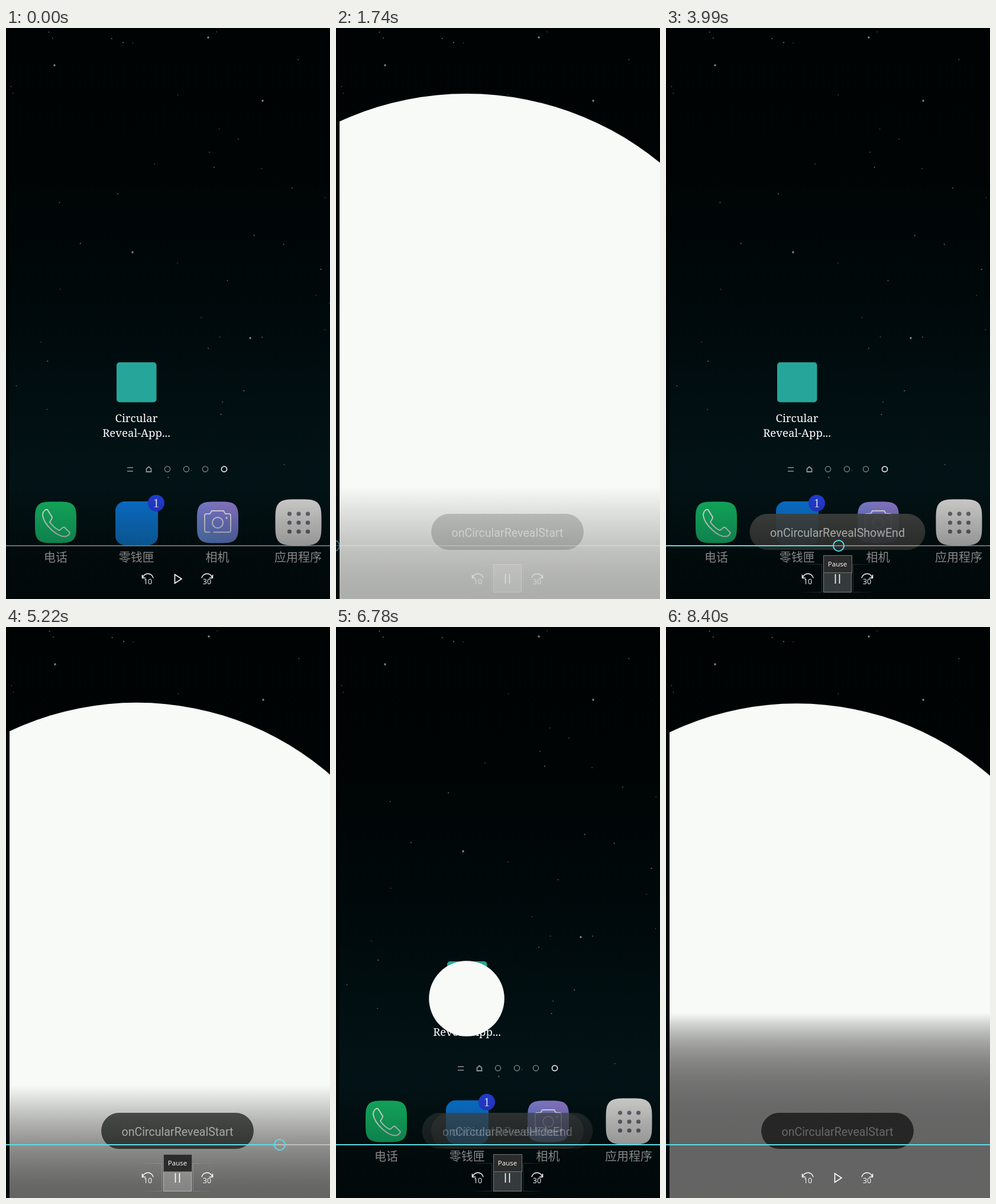
These frames come from a looping animation (548x965 px, 9000 ms). An HTML page with a canvas:

```html
<!DOCTYPE html>
<html lang="zh">
<head>
<meta charset="utf-8">
<title>Circular reveal</title>
<style>
  html, body { margin: 0; width: 100%; height: 100%; overflow: hidden; background: #000; }
  canvas { display: block; }
</style>
</head>
<body>
<canvas id="stage" width="548" height="965"></canvas>
<script>
const W = 548, H = 965, LOOP = 9000, HOLD_FROM = 8400;
let ctx = document.getElementById('stage').getContext('2d');

const clamp = v => Math.max(0, Math.min(1, v));
const ramp = (t, from, to) => clamp((t - from) / (to - from));
const lerp = (a, b, p) => a + (b - a) * p;
const easeInOut = p => (1 - Math.cos(Math.PI * clamp(p))) / 2;

function track(points, t) {
  const next = points.findIndex(([time]) => t < time);
  if (next < 1) return points.at(next)[1];
  const [t0, v0] = points[next - 1], [t1, v1] = points[next];
  return lerp(v0, v1, ramp(t, t0, t1));
}

function withAlpha(alpha, draw) {
  if (alpha <= 0) return;
  ctx.save();
  ctx.globalAlpha *= alpha;
  draw();
  ctx.restore();
}

// Evenly spaced colours from one point to another
function gradient(x0, y0, x1, y1, colors) {
  const g = ctx.createLinearGradient(x0, y0, x1, y1);
  colors.forEach((color, i) => g.addColorStop(i / (colors.length - 1), color));
  return g;
}

function roundRect(x, y, w, h, r, fill) {
  ctx.beginPath();
  ctx.roundRect(x, y, w, h, r);
  ctx.fillStyle = fill;
  ctx.fill();
}

function squircle(cx, cy, r, fill) {
  const bend = v => Math.sign(v) * Math.sqrt(Math.abs(v));
  ctx.beginPath();
  for (let a = 0; a < 2 * Math.PI; a += 0.03)
    ctx.lineTo(cx + r * bend(Math.cos(a)), cy + r * bend(Math.sin(a)));
  ctx.fillStyle = fill;
  ctx.fill();
}

function disc(x, y, r, fill) {
  ctx.beginPath();
  ctx.arc(x, y, r, 0, 2 * Math.PI);
  ctx.fillStyle = fill;
  ctx.fill();
}

function ring(x, y, r, color, width) {
  ctx.beginPath();
  ctx.arc(x, y, r, 0, 2 * Math.PI);
  ctx.strokeStyle = color;
  ctx.lineWidth = width;
  ctx.stroke();
}

function line(path, color, width) {
  ctx.strokeStyle = color;
  ctx.lineWidth = width;
  ctx.stroke(new Path2D(path));
}

function text(str, x, y, font, color = '#fff') {
  ctx.font = font;
  ctx.fillStyle = color;
  ctx.textAlign = 'center';
  ctx.fillText(str, x, y);
}

// Home screen

const SERIF = '18.6px "Noto Serif", serif';
const LABEL = '300 20px "Noto Sans CJK SC", "Noto Sans CJK", sans-serif';

function seededRandom(seed) {
  return () => (seed = seed * 16807 % 2147483647) / 2147483647;
}

function drawSky() {
  ctx.fillStyle = gradient(0, 0, 0, H, ['#000303', '#000404', '#00090b', '#021215', '#031517']);
  ctx.fillRect(0, 0, W, H);
  ctx.fillStyle = 'rgba(0,0,0,.6)';
  ctx.fillRect(0, 0, 6, H);
}

function drawStars() {
  const random = seededRandom(77);
  for (let i = 0; i < 44; i++)
    disc(8 + random() * 540, random() * 770, 0.7 + random() * 0.5, 'rgba(160,175,175,.55)');
  for (const [x, y] of [[82, 63], [342, 16], [434, 123], [214, 379], [413, 524]])
    disc(x, y, 1.7, 'rgba(190,200,200,.7)');
}

function drawPageMarks() {
  const grey = '#8b9294';
  line('M205 743h10M205 749h10', grey, 1.5);
  line('M237.5 750v-5l4-3.5 4 3.5v5z', grey, 1.8);
  for (let i = 0; i < 4; i++) ring(273 + 32 * i, 745.5, 4.6, i < 3 ? grey : '#fff', i < 3 ? 1.2 : 1.5);
}

function drawDock() {
  squircle(84, 835.5, 35, gradient(0, 800, 0, 871, ['#14b863', '#19d77f']));
  line('M67 814q-5 3-5 10q2 12 15 24q14 13 25 11q5-2 6-6l-9-9q-3-1-6 3l-3 2q-9-4-16-14l3-5q2-3 0-5l-7-11z',
    '#eafff2', 2);

  roundRect(185, 800, 72, 74, 16, gradient(0, 800, 0, 874, ['#0a76d8', '#1290f4']));
  disc(254, 803, 14, '#2540e0');
  text('1', 254, 810, '21px "Liberation Serif", serif');

  squircle(358, 835.5, 35, gradient(375, 800, 340, 871, ['#967fd4', '#7e8ae6', '#6fa6f8']));
  line('M345 852h-6q-3 0-3-3v-25q0-3 3-3h6l3-5h20l3 5h6q3 0 3 3v25q0 3-3 3h-26', '#f4f2ff', 2);
  ring(358, 836, 9, '#f4f2ff', 2);
  disc(373, 828, 1.8, '#f4f2ff');

  squircle(494.5, 835.5, 39, gradient(0, 796, 0, 874, ['#dededc', '#ffffff']));
  for (let i = 0; i < 9; i++) disc(479.5 + 15.5 * (i % 3), 821 + 15 * Math.floor(i / 3), 3.6, '#73747e');

  ['电话', '零钱匣', '相机', '应用程序'].forEach((name, i) => text(name, 84 + 136.7 * i, 902, LABEL));
}

function drawHome(t) {
  drawSky();
  ctx.save();
  ctx.translate(t < 1311 ? 0 : 1, 0);
  drawStars();
  roundRect(187, 565, 67.5, 67.5, 5, '#26a69a');
  text('Circular', 220.5, 665.5, SERIF);
  text('Reveal-App...', 220.5, 690.5, SERIF);
  drawPageMarks();
  drawDock();
  ctx.restore();
}

// Activity reveal: +1 opens, -1 closes

const reveals = [[1311, 1], [2937, -1], [4802, 1], [6249, -1], [7982, 1]];

function drawReveal(t) {
  const open = reveals.reduce((sum, [start, sign]) => sum + sign * easeInOut((t - start) / 660), 0);
  if (open <= 0.0001) return;
  ctx.save();
  ctx.beginPath();
  ctx.rect(6, 0, W - 6, H);
  ctx.clip();
  disc(221, 628, 709 * open, '#f8faf7');
  ctx.restore();
}

// Toasts: each lasts until the next one replaces it

const FADE = 450;
const toasts = [
  ['Start', 1620], ['ShowEnd', 3380], ['Start', 4740], ['HideEnd', 6555], ['Start', 7800]
].map(([event, start], i, all) => ({
  start,
  end: i + 1 < all.length ? all[i + 1][1] : LOOP,
  layer: toastLayer('onCircularReveal' + event)
}));

// Painted on its own layer so that pill and text fade as one
function toastLayer(message) {
  const layer = document.createElement('canvas'), screen = ctx;
  layer.width = W;
  layer.height = 61;
  ctx = layer.getContext('2d');
  ctx.font = '19.6px Roboto, sans-serif';
  const width = ctx.measureText(message).width + 69;
  roundRect(290 - width / 2, 0, width, 61, 30.5, 'rgba(78,81,78,.92)');
  text(message, 290, 39, ctx.font);
  ctx = screen;
  return layer;
}

function drawToast({ start, end, layer }, t) {
  const alpha = ramp(t, start, start + FADE) * (1 - ramp(t, end, end + FADE));
  withAlpha(alpha, () => ctx.drawImage(layer, 0, 821));
}

// Video player controls

const knobTrack = [[1740, -3], [2190, 61], [3090, 202], [3990, 292], [5190, 463], [5940, 562]];

function drawShade(tall) {
  const top = lerp(775, 652, tall), power = lerp(1.6, 4.8, tall);
  const colors = Array.from({ length: 21 }, (_, i) => `rgba(0,0,0,${0.6 * (1 - (1 - i / 20) ** power)})`);
  ctx.fillStyle = gradient(0, top, 0, H, colors);
  ctx.fillRect(6, top, W - 6, H - top);
}

function drawSeekBar(t) {
  ctx.fillStyle = 'rgba(255,255,255,.4)';
  ctx.fillRect(0, 874, W, 2);
  if (t < 1000) return;
  // The knob moves in steps of 150 ms
  const x = track(knobTrack, Math.floor((t - 90) / 150) * 150 + 90);
  ctx.fillStyle = '#5cdbe4';
  ctx.fillRect(0, 874, x - 9, 2);
  ring(x, 875, 9, '#5cdbe4', 2);
}

function drawSkip(x, label, side) {
  ctx.save();
  ctx.translate(x, 931);
  text(label, 0, 9, '12.5px "Open Sans", "Noto Sans", sans-serif');
  ctx.scale(side, 1);
  line('M-9 -1.5A9.2 9.2 0 0 1 9 -1.5M-9.5 -7V-1.5H-4', '#fff', 1.5);
  ctx.restore();
}

function frameBox(x, y, w, h, fill) {
  ctx.fillStyle = fill;
  ctx.fillRect(x, y, w, h);
  ctx.strokeStyle = 'rgba(255,255,255,.35)';
  ctx.lineWidth = 1;
  ctx.strokeRect(x + .5, y + .5, w - 1, h - 1);
}

function drawButtonFrame() {
  frameBox(266, 906, 48, 48, 'rgba(255,255,255,.2)');
  const clear = 'rgba(255,255,255,0)';
  line('M225 906.5H263.5V953.5H225M355 906.5H316.5V953.5H355',
    gradient(225, 0, 355, 0, [clear, 'rgba(255,255,255,.28)', clear]), 1);
}

function drawTooltip() {
  frameBox(266, 891, 49, 30, '#2b2b2b');
  text('Pause', 290, 910, '11.5px "Open Sans", "Noto Sans", sans-serif');
}

function drawPlayer(t) {
  const visible = t < 1000 ? 1 - ramp(t, 110, 900) : ramp(t, 1600, 1880);
  const paused = t < 90 || t >= 7680;
  withAlpha(visible, () => {
    drawShade(ramp(t, 7650, 8050));
    drawSeekBar(t);
    drawSkip(240, '10', 1);
    drawSkip(340, '30', -1);
    if (t >= 90) withAlpha(1 - ramp(t, 7650, 7900), drawButtonFrame);
    line(paused ? 'M285.5 923.5V938.5L297 931Z' : 'M286.5 923V939M293.5 923V939', '#fff', 1.6);
    withAlpha(ramp(t, 2400, 2600) * (1 - ramp(t, 7200, 7410)), drawTooltip);
  });
}

function frame() {
  const t = Math.min(performance.now() % LOOP, HOLD_FROM);
  drawHome(t);
  drawReveal(t);
  toasts.forEach(toast => drawToast(toast, t));
  drawPlayer(t);
  requestAnimationFrame(frame);
}
frame();
</script>
</body>
</html>
```
